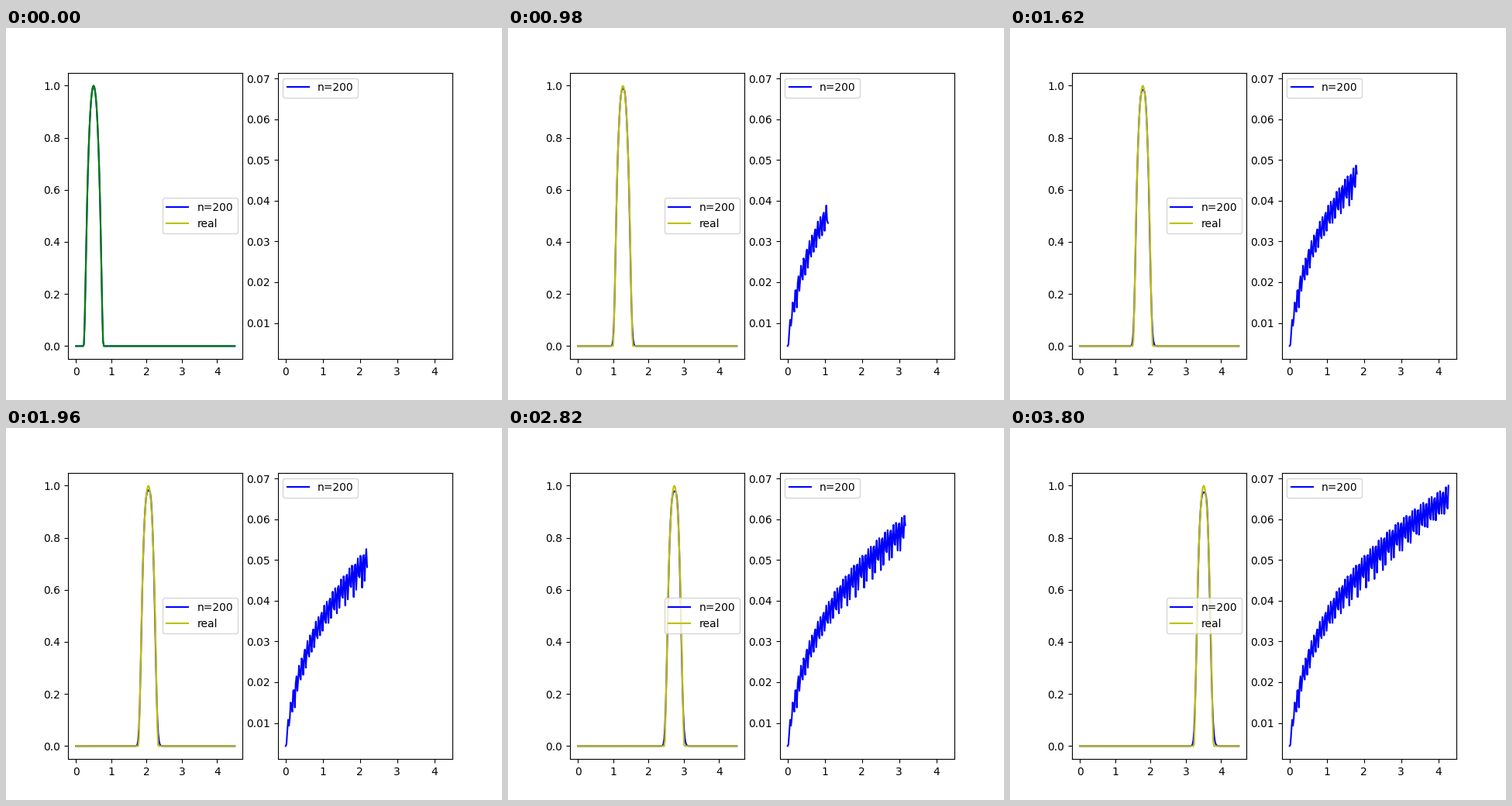
Animation of 640 by 480 pixels, one loop 3820 ms. Source, as a matplotlib script:

```python
import numpy as np
import matplotlib.pyplot as plt
from matplotlib.animation import FuncAnimation

N = 200        # grid points
LENGTH = 4.5
STEPS = 190
SPEED = 0.7    # also the Courant number, since dt equals dx

x = np.linspace(0, LENGTH, N)
dx = x[1] - x[0]
dt = dx


def bump(s, radius=0.3):
    """Smooth pulse of height 1 that vanishes beyond the radius."""
    w = 1 - (s / radius) ** 2
    inside = w > 1e-3
    return np.where(inside, np.exp(1 - 1 / np.where(inside, w, 1)), 0.0)


def exact(step):
    return bump(x - 0.5 - SPEED * dt * step)


def advance(u):
    """One upwind step with van Leer limited slopes."""
    d = np.diff(u)
    a, b = d[:-1], d[1:]
    prod = a * b
    same = prod > 0
    slope = np.zeros_like(u)
    slope[1:-1] = np.where(same, 2 * prod / np.where(same, a + b, 1), 0)
    flux = SPEED * u + 0.5 * SPEED * (1 - SPEED) * slope
    new = u.copy()
    new[1:] -= np.diff(flux)
    return new


states = [exact(0)]
for _ in range(STEPS):
    states.append(advance(states[-1]))
errors = np.array([np.abs(states[k] - exact(k)).max()
                   for k in range(1, STEPS + 1)])
times = dt * np.arange(STEPS)

plt.rcParams["font.family"] = "DejaVu Sans"
fig, (ax_wave, ax_err) = plt.subplots(1, 2, figsize=(6.4, 4.8), dpi=100)

wave_line, = ax_wave.plot(x, states[0], "b", label="n=200")
real_line, = ax_wave.plot(x, exact(0), "y", label="real")
err_line, = ax_err.plot(times, errors, "b", label="n=200")
ax_wave.legend(loc="center right")
ax_err.legend(loc="upper left")

# Freeze the limits at the extent of the full data
for ax in (ax_wave, ax_err):
    ax.set_xlim(ax.get_xlim())
    ax.set_ylim(ax.get_ylim())


def update(step):
    wave_line.set_ydata(states[step])
    real_line.set_ydata(exact(step))
    real_line.set_color("y" if step else "g")
    err_line.set_data(times[:step], errors[:step])
    return wave_line, real_line, err_line


def reset():
    return update(0)


anim = FuncAnimation(fig, update, frames=STEPS + 1, init_func=reset,
                     interval=20, repeat=True, repeat_delay=0, blit=False)
plt.show()
```
